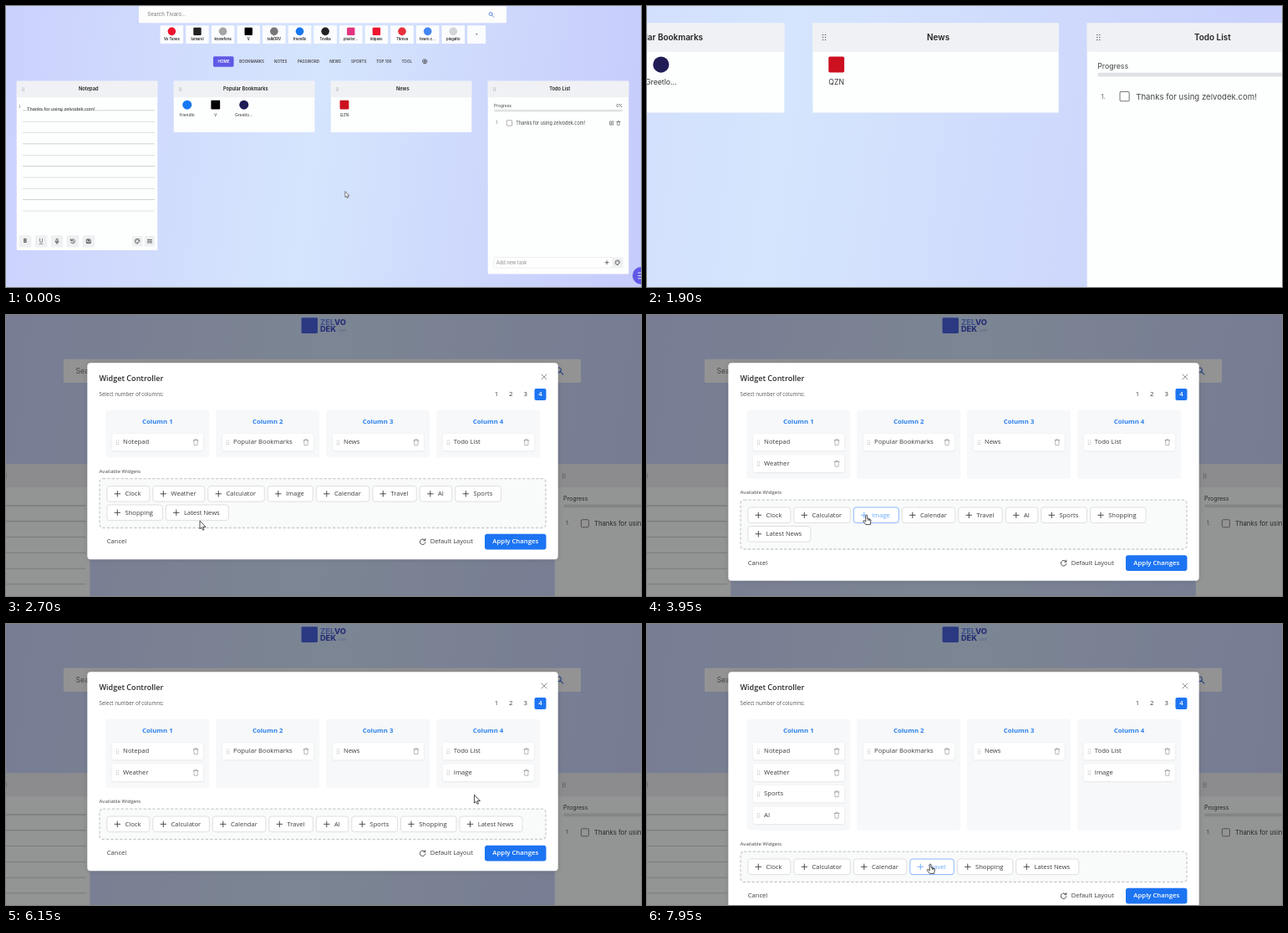
An HTML page with a canvas for the animation above (8 s loop, 760 by 336 pixels).

```html
<!DOCTYPE html>
<html lang="en">
<head>
<meta charset="utf-8">
<title>Widget controller demo</title>
<style>
html, body { margin: 0; width: 100%; height: 100%; overflow: hidden; }
canvas { display: block; width: 760px; height: 336px; }
</style>
</head>
<body>
<canvas id="stage"></canvas>
<script>
const W = 760, H = 336, LOOP = 8000;
const canvas = document.getElementById('stage');
const ratio = window.devicePixelRatio || 1;
canvas.width = W * ratio;
canvas.height = H * ratio;
const ctx = canvas.getContext('2d');

const PAGE_FONT = 'Inter, sans-serif', MODAL_FONT = '"Open Sans", sans-serif';
const BLUE = '#1d74f2', PURPLE = '#6059e6', INK = '#3c3c3c';

// Camera keys: time, scale, x, y
const camera = [
  [0, .7107, 110, -37.2], [80, .7107, 110, -37.2], [850, 1.6368, -761.6, -531.4],
  [1680, 1.6368, -761.6, -531.4], [2060, 1, 0, 0], [LOOP, 1, 0, 0]
];
// Pointer keys: time, x, y
const pointer = [
  [0, 416.4, 364.8], [100, 416.4, 364.8], [850, 880, 482], [1300, 895.9, 497.5],
  [1500, 914, 505], [2100, 914, 505], [2660, 232, 246.5], [2750, 232, 246.5],
  [3050, 210, 216], [3200, 210, 216], [3500, 216, 233], [4150, 276, 241],
  [4400, 276, 241], [4800, 181, 204], [4950, 181, 204], [5727, 573, 203.5],
  [5900, 573, 200], [6000, 573, 200], [6750, 454, 244], [7100, 454, 244],
  [7500, 391, 266], [7720, 391, 266], [7940, 339, 287], [LOOP, 339, 287]
];
const ADDED = { Weather: 3180, Image: 4380, Sports: 7080, AI: 7710 };
const GRAB = 4950, DROP = 5920;

const chips = [
  ['Clock', 51], ['Weather', 62], ['Calculator', 67.5], ['Image', 54], ['Calendar', 63.5],
  ['Travel', 52.5], ['AI', 38.5], ['Sports', 54.7], ['Shopping', 66.5], ['Latest News', 75]
];
const links = [
  ['Vo Tunes', '#f0142f'], ['lumarel', '#222', 1], ['knowforia', '#a5a5a5'], ['V', '#000', 1],
  ['talkORV', '#777'], ['friendlo', '#1877f2'], ['Tovika', '#222'], ['pixelor...', '#e1357f', 1],
  ['klipavo', '#f0142f', 1], ['Threva', '#e8303c'], ['tivaro.c...', '#4285f4'],
  ['pingalto', '#d3d6d6'], ['+']
];
const nav = [
  ['HOME', 260.5], ['BOOKMARKS', 294.2], ['NOTES', 328.8], ['PASSWORD', 362], ['NEWS', 394.2],
  ['SPORTS', 422.2], ['TOP 100', 452.4], ['TOOL', 479.8]
];

const clamp = v => Math.max(0, Math.min(1, v));
const progress = (t, from, to) => clamp((t - from) / (to - from));
const smooth = p => p * p * (3 - 2 * p);

function sample(keys, t) {
  const i = Math.max(1, keys.findIndex(k => k[0] > t));
  const a = keys[i - 1], b = keys[i];
  const p = smooth(progress(t, a[0], b[0]));
  return a.slice(1).map((v, n) => v + (b[n + 1] - v) * p);
}

function text(str, x, y, size, color = '#222', weight = 400, align = 'left', font = PAGE_FONT) {
  ctx.font = `${weight} ${size}px ${font}`;
  ctx.fillStyle = color;
  ctx.textAlign = align;
  ctx.textBaseline = 'middle';
  ctx.fillText(str, x, y);
}
const label = (str, x, y, size, color, weight, align) =>
  text(str, x, y, size, color, weight, align, MODAL_FONT);

function box(x, y, w, h, fill, radius = 0, stroke, width = .8) {
  ctx.beginPath();
  ctx.roundRect(x, y, w, h, radius);
  if (fill) { ctx.fillStyle = fill; ctx.fill(); }
  if (stroke) { ctx.strokeStyle = stroke; ctx.lineWidth = width; ctx.stroke(); }
}
function disc(x, y, r, fill) {
  ctx.beginPath();
  ctx.arc(x, y, r, 0, 7);
  ctx.fillStyle = fill;
  ctx.fill();
}
function icon(path, x, y, color = '#333', width = .7, scale = 1, fill) {
  ctx.save();
  ctx.translate(x, y);
  ctx.scale(scale, scale);
  ctx.lineWidth = width / scale;
  ctx.lineJoin = ctx.lineCap = 'round';
  ctx.strokeStyle = color;
  const shape = new Path2D(path);
  if (fill) { ctx.fillStyle = fill; ctx.fill(shape); }
  ctx.stroke(shape);
  ctx.restore();
}
function dots(x, y, gap, color) {
  for (let i = 0; i < 6; i++)
    disc(x + (i % 2 - .5) * gap, y + ((i >> 1) - 1) * gap, gap * .26, color);
}

const ICON = {
  plus: 'M-3 0H3M0-3V3',
  cross: 'M-3-3L3 3M3-3L-3 3',
  trash: 'M-3-2.3H3M-1.2-2.3V-3.5H1.2V-2.3M-2.3-2.3L-2 3.5H2L2.3-2.3',
  search: 'M1.2-.8A2 2 0 1 1-2.8-.8A2 2 0 1 1 1.2-.8M.7.7L3 3',
  edit: 'M0-2.3H-2.3V2.3H2.3V0M-.7.7L-.4-.5L2-2.9L2.9-2L.5.4Z',
  mic: 'M-1-2A1 1 0 0 1 1-2V0A1 1 0 0 1-1 0ZM-2 0A2 2 0 0 0 2 0M0 2V3',
  history: 'M-2.2-1.2A2.5 2.5 0 1 1-2.4.8M-2.6-2.6V-1H-1M0-1.3V.2L1 .9',
  save: 'M-2.3-2.3H1.3L2.3-1.3V2.3H-2.3ZM-1-2.3V-.8H1V-2.3M-1.2 2.3V.6H1.2V2.3',
  palette: 'M.3 2.7A2.8 2.8 0 1 1 2.7-.2Q2.7 1.1 1.3 1Q.2 1 .6 2Q.8 2.7.3 2.7M-1.5 0h.01M-.9-1.3h.01M.6-1.5h.01M1.5-.6h.01',
  lines: 'M-2.6-1.8H2.6M-2.6 0H2.6M-2.6 1.8H2.6',
  gear: 'M-1.3-2.3H1.3L2.7 0L1.3 2.3H-1.3L-2.7 0ZM.9 0A.9.9 0 1 1-.9 0A.9.9 0 1 1 .9 0',
  reload: 'M2.8-1.8A3.3 3.3 0 1 0 3.3.7M3.2-3.6V-1.5H1.2',
  arrow: 'M0 0V9.4L2.1 7.5L3.6 10.8L5.1 10.1L3.7 6.9H6.6Z',
  hand: 'M-1 1Q-1 0 0 0T1 1V4.2L4.2 5Q5.6 5.4 5.4 6.9L4.6 11.4H-.7L-3.8 7.5Q-3.7 6-2.3 6.6L-1 7.7ZM2.3 4.6V6.4M3.8 5V6.6',
  fist: 'M-3.6-2.2Q-2.6-4-1.5-3.2Q-.3-4.7.7-3.4Q2-4.2 2.6-2.8Q4.1-2.8 4-.8Q3.9 2.4 2.4 4.2H-2L-4 .8Q-4.6-.9-3.6-.8Z'
};

function widget(column, bottom, title) {
  const x = 12.8 + 188 * column;
  box(x, 89.7, 168.5, bottom - 89.7, '#fdfefe');
  box(x, 89.7, 168.5, 19.6, '#f0f1f4');
  dots(x + 7.8, 99.5, 1.7, '#66666c');
  text(title, x + 86, 99.6, 5.7, '#222', 600, 'center');
}
function bookmark(name, x, color, square) {
  if (square) box(x - 5.4, 112.7, 10.8, 10.8, color, 1);
  else disc(x, 118.1, 5.5, color);
  text(name, x, 130.2, 5, '#333', 400, 'center');
}

function drawPage() {
  const sky = ctx.createLinearGradient(-8, 120, 772, 220);
  sky.addColorStop(0, '#cbd1fd');
  sky.addColorStop(.48, '#d5e5fd');
  sky.addColorStop(1, '#c6cbfb');
  ctx.fillStyle = sky;
  ctx.fillRect(-300, -300, 1500, 1200);

  box(361.3, -35, 13.8, 13.4, '#4a62e0', 1);
  text('ZEL', 377.2, -30.8, 6.6, '#6c8df0', 800);
  const brandWidth = ctx.measureText('ZEL').width;
  text('VO', 377.2 + brandWidth, -30.8, 6.6, '#4150c8', 800);
  text('DEK', 377.2, -24.8, 6.6, '#4150c8', 800);
  text('.com', 391.5, -23.8, 3.4, '#9fb2ef', 500);

  box(159, .3, 440, 20, '#fdfdfe', 1);
  text('Search Tivaro...', 169.3, 10.3, 6.2, '#757575');
  icon(ICON.search, 581, 10.3, '#3f6fe0', .8);

  links.forEach(([name, color, square], i) => {
    const x = 184.6 + 30.63 * i, width = color ? 27.6 : 22, mid = x + width / 2;
    box(x, 23.2, width, 21.8, '#fbfcfe', .6);
    if (!color) return text(name, mid, 33.6, 5, '#333', 400, 'center');
    if (square) box(mid - 4.7, 25.6, 9.4, 9.4, color, 1);
    else disc(mid, 30.3, 4.8, color);
    text(name, mid, 39.7, 4.2, '#222', 600, 'center');
  });

  box(248, 60.3, 24.6, 12.3, PURPLE, 1.6);
  nav.forEach(([name, x], i) => text(name, x, 66.4, 4.6, i ? '#333' : '#fff', i ? 500 : 600, 'center'));
  icon(ICON.gear, 501.3, 66.3, '#333', .8);

  widget(0, 292, 'Notepad');
  for (let i = 0; i < 10; i++) box(20, 124.5 + i * 13.35, 158, .6, '#c3c3c7');
  text('I', 16, 120.2, 5, '#555');
  text('Thanks for using zelvodek.com!', 25, 123.2, 5.8, '#333', 400, 'left', '"Liberation Sans", Arial, sans-serif');
  [23, 42, 61, 80, 99].forEach(x => box(x - 7.3, 274.2, 14.6, 14.2, '#eff0f2', 1));
  [157.3, 172].forEach(x => box(x - 6.2, 275, 12.4, 12.4, '#eff0f2', 1));
  text('B', 23, 281.5, 6, '#333', 700, 'center');
  text('U', 42, 281.2, 5.6, '#333', 400, 'center');
  box(39.8, 284, 4.4, .5, '#333');
  ['mic', 'history', 'save'].forEach((name, i) => icon(ICON[name], 61 + 19 * i, 281.3));
  icon(ICON.palette, 157.3, 281.2);
  icon(ICON.lines, 172, 281.2);

  widget(1, 151, 'Popular Bookmarks');
  bookmark('friendlo', 216.8, '#1877f2');
  bookmark('V', 250.8, '#000', true);
  bookmark('Greetlo...', 284.8, '#201c56');
  widget(2, 151, 'News');
  bookmark('QZN', 405, '#cc1020', true);

  widget(3, 320.5, 'Todo List');
  text('Progress', 584, 119.3, 5, '#444');
  text('0%', 738, 119.3, 4.8, '#444', 400, 'right');
  box(584, 123.7, 154, 2.7, '#e1e2e5', 1.3);
  text('1.', 586.3, 140, 4.5, '#666');
  box(599.3, 136.7, 6.4, 6.4, '#fff', .8, '#777', .6);
  text('Thanks for using zelvodek.com!', 610.3, 140.2, 5.5, '#444');
  icon(ICON.edit, 724.8, 140, '#444', .6, .9);
  icon(ICON.trash, 733, 140, '#444', .5, .68);
  box(584, 300.4, 142, 12.7, '#fff', .5, '#dcdde2', .5);
  text('Add new task', 586.8, 306.9, 5.7, '#8b8c92');
  icon(ICON.plus, 719.2, 306.7, '#333', .7, .72);
  box(726, 300.4, 12.5, 12.7, '#eff0f2', .5);
  icon(ICON.palette, 732, 306.8, '#333', .65);

  disc(760.3, 322.4, 10.4, PURPLE);
  [-3.4, 0, 3.4].forEach(dy => box(756.4, 321.95 + dy, 7.8, .9, '#fff'));
}

function card(name, x, y) {
  ctx.save();
  ctx.shadowColor = 'rgba(0,0,0,.1)';
  ctx.shadowBlur = 2 * ratio;
  ctx.shadowOffsetY = .6 * ratio;
  box(x, y, 109, 20.5, '#fff', 2);
  ctx.restore();
  dots(x + 6.5, y + 10.2, 2.2, '#b0b0b4');
  label(name, x + 13, y + 10.4, 7.7, INK);
  icon(ICON.trash, x + 100, y + 10.2, '#999', .7);
}

function modalState(t) {
  const dragging = t >= GRAB && t < DROP;
  const columns = [['Notepad'], ['Popular Bookmarks'], ['News'], ['Todo List']];
  for (const name in ADDED) {
    if (t < ADDED[name] || (name === 'Image' && dragging)) continue;
    columns[name === 'Image' && t >= DROP ? 3 : 0].push(name);
  }
  const rows = dragging ? 3 : Math.max(...columns.map(c => c.length));
  const panelBottom = 170.3 + 25.5 * (rows - 1);
  let x = 120.8, y = panelBottom + 34.2;
  const available = chips.filter(([name]) => !(t >= ADDED[name])).map(([name, w]) => {
    if (x + w > 637) { x = 120.8; y += 22.5; }
    const chip = { name, x, y, w };
    x += w + 4;
    return chip;
  });
  return { dragging, columns, panelBottom, available, boxBottom: y + 27.5 };
}

function drawModal(state, hovered, px, py) {
  const { columns, panelBottom, available, boxBottom, dragging } = state;
  const footer = boxBottom + 16.7;
  ctx.save();
  ctx.shadowColor = 'rgba(0,0,0,.12)';
  ctx.shadowBlur = 6 * ratio;
  box(97.3, 57.3, 563.4, footer + 21 - 57.3, '#fff', 4);
  ctx.restore();

  label('Widget Controller', 111.5, 76.5, 9.05, '#2a2a2a', 600);
  icon(ICON.cross, 644, 74, '#777', .8);
  label('Select number of columns:', 111.5, 95.3, 6.2, '#555');
  box(632.5, 88, 14, 14, BLUE, 2);
  [587, 604.3, 621.8, 639.5].forEach((x, i) =>
    label(i + 1, x, 95.3, 7.8, i < 3 ? INK : '#fff', i < 3 ? 400 : 600, 'center'));

  columns.forEach((names, i) => {
    const x = 119.3 + 131.9 * i;
    const over = dragging && px >= x && px < x + 124;
    box(x, 113.7, 124, panelBottom - 113.7, over ? '#eff2ff' : '#f7f8f9', 3);
    label(`Column ${i + 1}`, x + 62, 128.3, 7.8, '#2a80ee', 700, 'center');
    names.forEach((name, row) => card(name, x + 7.8, 142 + 25.5 * row));
  });

  label('Available Widgets', 111.5, panelBottom + 16.8, 6.1, '#444', 500);
  ctx.setLineDash([3.2, 2.2]);
  box(112, panelBottom + 25.3, 534, boxBottom - panelBottom - 25.3, '#f9fafa', 4, '#c9cbcd', 1.3);
  ctx.setLineDash([]);
  available.forEach(chip => {
    const active = chip === hovered, ink = active ? '#69a7ff' : INK;
    box(chip.x, chip.y, chip.w, 18.6, '#fff', 3, active ? '#6ba6fa' : '#d9d9d9');
    icon(ICON.plus, chip.x + 12.5, chip.y + 9.3, ink, .9, 1.1);
    label(chip.name, chip.x + 21.7, chip.y + 9.6, 7.6, ink);
  });

  label('Cancel', 120.8, footer, 7.6, INK);
  icon(ICON.reload, 498.7, footer, INK, .9);
  label('Default Layout', 507.7, footer, 7.5, INK);
  box(573, footer - 9.4, 73.5, 18.6, BLUE, 3);
  label('Apply Changes', 609.8, footer, 7.75, '#fff', 600, 'center');
  if (dragging) card('Image', px - 54, py - 10.5);
}

function draw(t) {
  const [scale, cx, cy] = sample(camera, t);
  const [px, py] = sample(pointer, t);
  ctx.setTransform(ratio * scale, 0, 0, ratio * scale, ratio * cx, ratio * cy);

  ctx.save();
  ctx.translate(-154.8, 52.4);
  ctx.scale(1.407, 1.407);
  drawPage();
  ctx.restore();

  const dim = .42 * progress(t, 2010, 2210);
  if (dim) box(-10, -10, W + 20, H + 20, `rgba(0,0,0,${dim})`);

  const shown = smooth(progress(t, 2110, 2330));
  let cursor = 'arrow';
  if (shown) {
    const state = modalState(t);
    const hovered = state.available.find(c =>
      px > c.x && px < c.x + c.w && py > c.y && py < c.y + 18.6);
    cursor = state.dragging ? 'fist' : hovered ? 'hand' : 'arrow';
    ctx.save();
    ctx.globalAlpha = shown;
    ctx.translate(379, 175);
    ctx.scale(.8 + .2 * shown, .8 + .2 * shown);
    ctx.translate(-379, -175);
    drawModal(state, hovered, px, py);
    ctx.restore();
  }
  icon(ICON[cursor], px, py, '#222', .8, 1, '#fff');
}

const start = performance.now();
function tick() {
  draw((performance.now() - start) % LOOP);
  requestAnimationFrame(tick);
}
tick();
</script>
</body>
</html>
```
